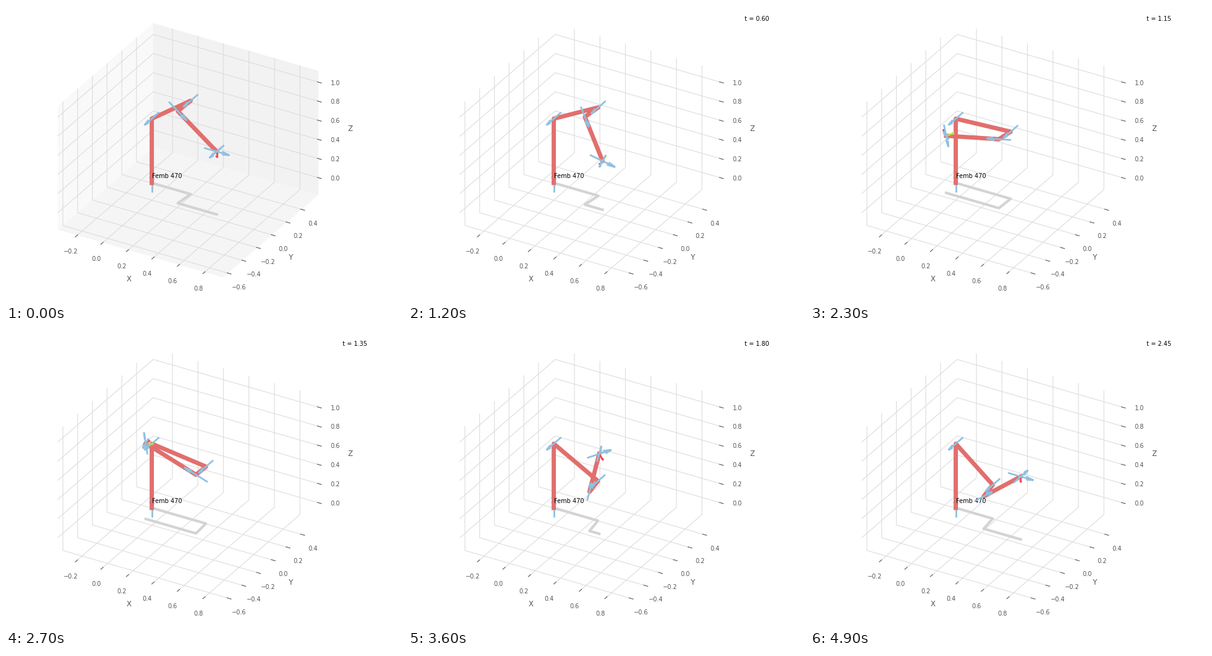
These frames come from a looping animation (640x480 px, 5000 ms). A matplotlib script:

```python
import numpy as np
import matplotlib.pyplot as plt
from matplotlib.animation import FuncAnimation
from matplotlib.collections import LineCollection

W, H, DPI = 640, 480, 100
FRAMES, INTERVAL = 50, 100
GREY, BLUE = "#555555", "#8FC1E2"

# Orthographic view: azimuth -60, elevation 30, z squeezed to 3/4
SCALE, VIEW_CENTRE = 237.9, np.array([294.49, 233.51])
CENTRE = np.array([0.2987, -0.0222, 0.469])
HALF = 0.6492
LOW, HIGH = CENTRE - HALF, CENTRE + HALF
SQUEEZE = np.array([1, 1, 0.75])
C30 = np.sqrt(3) / 2
AXES_2D = np.array([[C30, 0.5, 0], [0.25, -C30 / 2, -C30]]) * SQUEEZE
TOWARDS_VIEWER = np.array([C30 / 2, -0.75, 0.5]) * SQUEEZE

# Robot arm, joint angles at both ends of the move
BASE_H, UPPER, OFFSET, ELBOW, FOREARM = 0.67183, 0.4318, 0.15005, 0.0203, 0.4318
Q_START = np.array([np.pi / 4, np.pi, 0, np.pi / 4, 0])
Q_END = np.array([-0.8335, 0.0940, -np.pi, 0.8312, np.pi])


def project(points):
    return VIEW_CENTRE + SCALE * (np.asarray(points, float) - CENTRE) @ AXES_2D.T


def ease(s):
    return 10 * s**3 - 15 * s**4 + 6 * s**5


def arrow(start, vec):
    """Shaft and two barbs, the barbs turned 15 degrees in the vertical plane."""
    side = np.array([vec[1], -vec[0], 0])
    norm = np.linalg.norm(side)
    side = side / norm if norm > 1e-9 else np.array([0, 1, 0])
    tip = start + vec
    lift = np.cross(side, vec)
    c, s = np.cos(np.pi / 12), np.sin(np.pi / 12)
    barbs = [tip - 0.3 * (c * vec + sign * s * lift) for sign in (1, -1)]
    return np.array([[start, tip], [tip, barbs[0]], [tip, barbs[1]]])


def pose(q):
    """Joint positions and the arrows for joint axes and tool frame."""
    q2, q3, q4, q5, q6 = q
    up, right, y = np.array([0, 0, 1.0]), np.array([1.0, 0, 0]), np.array([0, 1.0, 0])
    theta = q2 + q3
    x3 = np.cos(theta) * right + np.sin(theta) * up
    z3 = -np.sin(theta) * right + np.cos(theta) * up
    x4 = np.cos(q4) * x3 + np.sin(q4) * y
    z4 = np.sin(q4) * x3 - np.cos(q4) * y
    x5 = np.cos(q5) * x4 + np.sin(q5) * z3
    z5 = -np.sin(q5) * x4 + np.cos(q5) * z3
    x6 = np.cos(q6) * x5 - np.sin(q6) * z4
    y6 = -np.sin(q6) * x5 - np.cos(q6) * z4

    base = np.zeros(3)
    shoulder = BASE_H * up
    elbow = shoulder + UPPER * (np.cos(q2) * right + np.sin(q2) * up)
    fore = elbow - OFFSET * y + ELBOW * x3
    wrist = fore + FOREARM * z3

    joints = [(base, up), (shoulder, -y), (elbow, -y), (fore, z3), (wrist, z4), (wrist, z5)]
    arrows = [arrow(p - 0.1 * a, 0.2 * a) for p, a in joints]
    arrows += [arrow(wrist, 0.06 * x6), arrow(wrist, 0.06 * y6)]
    return np.array([base, shoulder, elbow, fore, wrist]), arrows


plt.rcParams.update({"font.family": "DejaVu Sans", "font.size": 7})
fig = plt.figure(figsize=(W / DPI, H / DPI), dpi=DPI, facecolor="white")
ax = fig.add_axes([0, 0, 1, 1])
ax.set_xlim(0, W)
ax.set_ylim(H, 0)
ax.axis("off")


def corner(i, j, k):
    return [(LOW, HIGH)[side][n] for n, side in enumerate((i, j, k))]


def add_pane(shade, corners):
    x, y = project([corner(*c) for c in corners]).T
    return ax.fill(x, y, color=str(shade), lw=0, zorder=0)[0]


panes = [
    add_pane(0.975, [(0, 0, 0), (0, 1, 0), (0, 1, 1), (0, 0, 1)]),
    add_pane(0.95, [(0, 1, 0), (1, 1, 0), (1, 1, 1), (0, 1, 1)]),
    add_pane(0.9625, [(0, 0, 0), (1, 0, 0), (1, 1, 0), (0, 1, 0)]),
]


def add_axis(n, name, first, grid_corners, edge, tick_dir, tick_sign):
    """Grid lines, white edge, ticks and labels of axis n."""
    edge_point = np.array(corner(*edge))
    outward = np.where(np.array(edge) == 1, 1.0, -1.0)
    outward[n] = 0
    grid, ticks = [], []
    for value in first + 0.2 * np.arange(6):
        line = np.array([corner(*c) for c in grid_corners])
        line[:, n] = value
        grid.append(project(line))
        at = edge_point.copy()
        at[n] = value
        step = np.zeros(3)
        step[tick_dir] = tick_sign * 0.01038
        ticks.append(project([at - step, at + 2 * step]))
        text = f"{abs(value):.1f}"
        text = "\u2212" + text if value < -0.01 else text
        ax.text(*project(at + 0.083 * outward), text, color=GREY, ha="center", va="top")
    ends = np.array([edge_point, edge_point])
    ends[:, n] = LOW[n], HIGH[n]
    ax.add_collection(LineCollection(grid, colors="#DCDCDC", linewidths=0.8, zorder=0.3))
    ax.plot(*project(ends).T, color="white", lw=1, zorder=0.5)
    ax.add_collection(LineCollection(ticks, colors=GREY, linewidths=0.8,
                                     capstyle="projecting", zorder=0.6))
    ax.text(*project(ends.mean(axis=0) + 0.158 * outward), name, color=GREY,
            size=8.4, ha="center", va="center")


add_axis(0, "X", -0.2, [(0, 1, 1), (0, 1, 0), (0, 0, 0)], (0, 0, 0), 1, -1)
add_axis(1, "Y", -0.6, [(0, 0, 1), (0, 0, 0), (1, 0, 0)], (1, 0, 0), 0, 1)
add_axis(2, "Z", 0.0, [(0, 0, 0), (0, 1, 0), (1, 1, 0)], (1, 1, 0), 0, 1)

shadow, = ax.plot([], [], color="lightgrey", lw=3, zorder=1.9)
arm, = ax.plot([], [], color="#E16F6D", lw=5, zorder=2)
ax.text(*project([0, 0, 0.05]), "Femb 470", zorder=3)
clock = ax.text(0.85 * W, 0.05 * H, "", zorder=30)
quivers = []
for colour in [BLUE] * 6 + ["#F84752", "#BADA55"]:
    quiver = LineCollection([], colors=colour, linewidths=2)
    ax.add_collection(quiver)
    quivers.append(quiver)


def update(i):
    q = Q_START + ease(i / (FRAMES - 1)) * (Q_END - Q_START)
    points, arrows = pose(q)
    arm.set_data(*project(points).T)
    shadow.set_data(*project(points * [1, 1, 0]).T)
    nearness = [(a @ TOWARDS_VIEWER).max() for a in arrows]
    for rank, k in enumerate(np.argsort(nearness, kind="stable")):
        quivers[k].set_segments(list(project(arrows[k])))
        quivers[k].set_zorder(1.5 + rank)
    # The back panes are only there before the clock starts
    for pane in panes:
        pane.set_visible(i == 0)
    clock.set_text(f"t = {0.05 * i:.2f}" if i else "")
    return [arm, shadow, clock, *quivers, *panes]


anim = FuncAnimation(fig, update, frames=FRAMES, interval=INTERVAL,
                     init_func=lambda: update(0), repeat=True, repeat_delay=0, blit=False)
plt.show()
```
